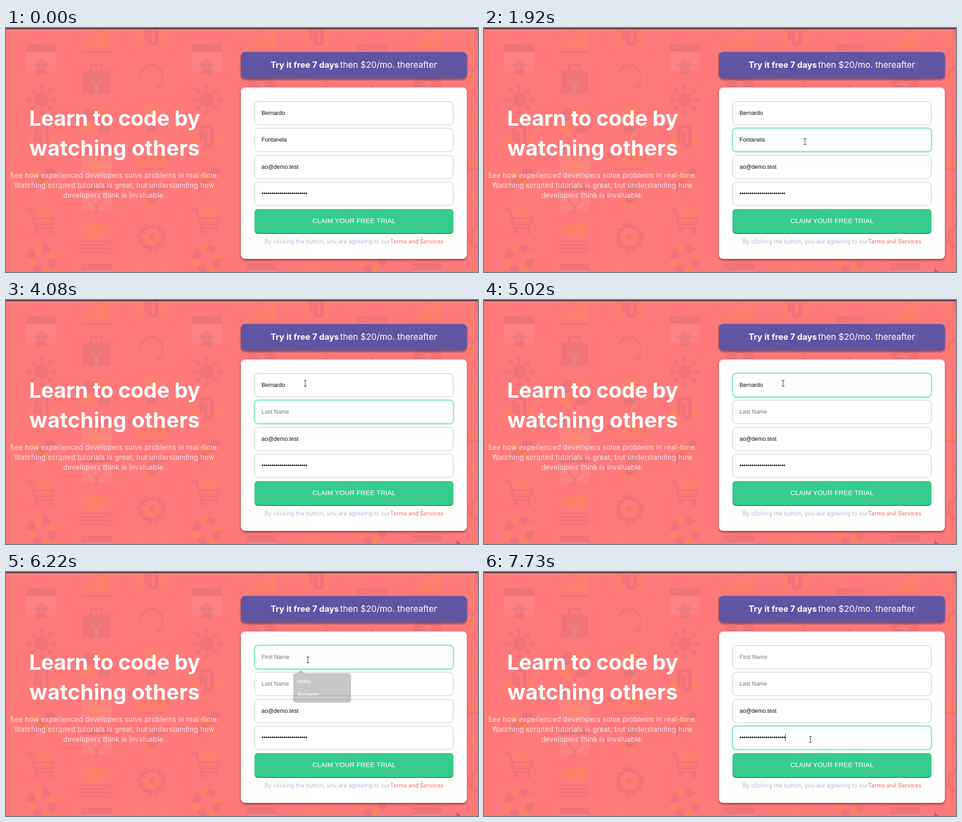
Animation of 1039x539 px, one loop 8 s. Source, as an HTML page:

```html
<!DOCTYPE html>
<html lang="en">
<head>
<meta charset="utf-8">
<title>Sign-up form</title>
<style>
html, body { margin: 0; width: 100%; height: 100%; overflow: hidden; background: #ff7979; }
svg { display: block; width: 1039px; height: 539px; }
text { font-family: Inter, "Open Sans", sans-serif; }
#icons * { --m: rgba(90, 70, 95, .1); --o: rgba(255, 150, 40, .2); --l: rgba(255, 255, 255, .07); }
#icons .m { fill: var(--m); }
#icons .o { fill: var(--o); }
#icons .l { fill: var(--l); }
#icons .ms { fill: none; stroke: var(--m); }
#icons .os { fill: none; stroke: var(--o); }
.raised { filter: drop-shadow(0 3px 2px rgba(70, 20, 25, .55)); }
.title { font-weight: 700; font-size: 47px; fill: #fff; text-anchor: middle; }
.lead { font-size: 15.2px; letter-spacing: .29px; fill: #f3e6ec; text-anchor: middle; }
.offer { fill: #fff; }
.terms { font-size: 12.7px; fill: #bab7d4; }
.link { font-size: 12.4px; font-weight: 500; fill: #ff7979; }
.field text, .button { font-family: "Liberation Sans", Arial, sans-serif; }
.field text { font-size: 12.5px; }
.box { fill: #fff; stroke: #c4c4c8; }
.focus { fill: #fff; stroke: #6be6b2; stroke-width: 1.4; filter: drop-shadow(0 0 2.2px rgba(70, 220, 155, .8)); }
.button { font-size: 15px; fill: #fff; text-anchor: middle; }
#popup text { font: 600 10.8px "Open Sans", "Noto Sans", sans-serif; fill: #f4f4f4; }
</style>
</head>
<body>
<svg viewBox="0 0 1039 539" xmlns="http://www.w3.org/2000/svg">
  <defs>
    <pattern id="icons" width="364" height="539" patternUnits="userSpaceOnUse"></pattern>
  </defs>
  <rect width="1039" height="539" fill="#ff7979"/>
  <rect width="1039" height="539" fill="url(#icons)"/>
  <rect width="1039" height="2.4" fill="#443b40"/>

  <text class="title" x="239" y="216" letter-spacing="-.3">Learn to code by</text>
  <text class="title" x="239" y="282" letter-spacing=".2">watching others</text>
  <text class="lead" x="238.5" y="330.5">See how experienced developers solve problems in real-time.</text>
  <text class="lead" x="238.5" y="352.5">Watching scripted tutorials is great, but understanding how</text>
  <text class="lead" x="238.5" y="374.5">developers think is invaluable.</text>

  <rect class="raised" x="517" y="53" width="497.5" height="58.5" rx="9" fill="#5f55a3"/>
  <text class="offer" x="582.5" y="88" font-size="18.5" font-weight="700">Try it free 7 days</text>
  <text class="offer" x="735.5" y="88" font-size="18.9">then $20/mo. thereafter</text>

  <rect class="raised" x="517" y="131.5" width="497.5" height="378.5" rx="9" fill="#fff"/>
  <g id="fields"></g>
  <rect x="547" y="400" width="438" height="55" rx="8" fill="#2a9f6d"/>
  <rect x="547" y="400" width="438" height="52.8" rx="8" fill="#38cc8c"/>
  <text class="button" x="766" y="431.4">CLAIM YOUR FREE TRIAL</text>
  <text class="terms" x="569" y="475.5">By clicking the button, you are agreeing to our</text>
  <text class="link" x="845.5" y="475.5">Terms and Services</text>

  <g id="popup">
    <path d="M639.5 222.5l8-8 8 8z" fill="#202020"/>
    <rect id="panel" x="630" y="222" width="132" rx="5" fill="#202020"/>
    <text id="item1" x="640" y="245"></text>
    <text id="item2" x="640" y="275"></text>
  </g>

  <path id="trail" d="M992 531l9 8h-9z" fill="#7a5560" opacity=".6"/>
  <g id="cursor">
    <path data-kind="beam" d="M-3-6.5H3M-3 6.5H3M0-6V6" fill="none" stroke="#222"/>
    <path data-kind="arrow" d="M0 0v15l3.5-3.3 2.4 5.5 2.3-1-2.4-5.4h4.8z" fill="#fff" stroke="#222" stroke-width=".9"/>
    <path data-kind="hand" d="M-1.5 1q1.5-2 3 0v6l7 1.5q2 .5 1.5 3L9 17H0l-5.500-7q0-2 2-1.500l2 2z" fill="#fff" stroke="#222" stroke-width=".9"/>
  </g>
</svg>
<script>
const $ = id => document.getElementById(id);
const clamp = v => Math.min(1, Math.max(0, v));
const range = n => [...Array(n).keys()];

// Background icons, each drawn around its own centre
const box = (c, x, y, w, h) => `<rect class="${c}" x="${x}" y="${y}" width="${w}" height="${h}"/>`;
const disc = (c, r, x = 0, y = 0) => `<circle class="${c}" r="${r}" cx="${x}" cy="${y}"/>`;
const ring = (c, r, w, parts = 0) =>
  `<circle class="${c}" r="${r}" stroke-width="${w}" stroke-dasharray="${parts ? Math.PI * r / parts : "none"}"/>`;
const line = (c, w, d) => `<path class="${c}" stroke-width="${w}" d="${d}"/>`;
const shape = (c, d) => `<path class="${c}" d="${d}"/>`;
const spin = (n, s) => range(n).map(i => `<g transform="rotate(${i * 360 / n})">${s}</g>`).join("");
const move = (x, y, s, turn = 0) => `<g transform="translate(${x} ${y}) rotate(${turn})">${s}</g>`;

const gear = ring("os", 10, 9) + ring("os", 16, 5, 8);
const win = y => box("m", -33, y, 66, 16) + box("l", -33, y + 16, 66, 43)
  + range(3).map(i => box("l", 7 * i - 28, y + 6, 4, 4)).join("");
const bars = range(4).map(i => box("o", 16 * i - 30, 2 - 9 * i, 12, 20 + 9 * i)).join("") + box("m", -33, 23, 66, 5);
const clip = line("ms", 7, "M-12 4v-26q0-6 6-6H6q6 0 6 6V8q0 6-6 6H2q-5 0-5-5v-26")
  + box("o", -31, -6, 13, 24) + box("o", 18, -6, 13, 24);
const upload = win(-34) + shape("m", "M0-4l-21 19h11v17h20V15h11z");
const virus = disc("m", 15) + spin(8, line("ms", 3, "M15 0h9") + disc("m", 4.5, 28));
const pencil = move(0, 0, box("m", -8, -34, 16, 68), 45) + move(0, 0, box("o", -6, -34, 12, 68), -45);
const cart = move(8, -14, gear) + line("ms", 4, "M-33-23h10l11 43h38M-18-2h46l-5 14h-37")
  + disc("m", 5, -9, 28) + disc("m", 5, 21, 28);
const buoy = ring("ms", 24, 16, 4) + move(0, 0, ring("os", 24, 16, 4), 45);
const briefcase = box("m", -30, -20, 60, 50) + line("ms", 5, "M-12-20v-13h24v13")
  + shape("l", "M-13-3q0 12 8 14v19H5V11q8-2 8-14L7 3H-7z");
const pictures = disc("m", 14, -16, -12) + disc("o", 14, 15, -16) + box("o", -31, 3, 26, 26) + box("m", 2, 3, 29, 26);
const search = win(-34) + ring("ms", 12, 5) + line("ms", 6, "M0 13v17");
const letter = shape("o", "M-32-26q14-12 30-8l24-2q12 8 8 22L16 0 6-8l-20 6q-16-8-18-24z")
  + range(4).map(i => box("m", -33, 3 + 8 * i, 66 - 8 * (i % 2), 3)).join("");
const headset = line("ms", 5, "M-24 0v-4a24 24 0 0 1 48 0v14q0 12-16 12")
  + box("o", -32, -12, 12, 24) + box("o", 20, -12, 12, 24);
const bulb = disc("o", 18, 0, -9) + box("m", -12, 11, 24, 22) + line("os", 4, "M-30-8h9M21-8h9");
const rocket = move(0, 0, shape("m", "M0-34q22 26 10 46h-20q-12-20 0-46z")
  + shape("o", "M-12-4l-14 18h14zM12-4l14 18H12zM-7 15H7L0 34z"), 40);
const cog = ring("ms", 24, 6) + ring("ms", 30, 5, 12) + spin(6, disc("o", 5, 13)) + disc("m", 5);
const hooks = [-30, -6, 18].map(x => line("os", 5, `M${x}-25q6-8 12 0 2 6-5 14`)).join("");

const columns = [
  [70, upload, virus, clip, pencil, cart, buoy],
  [27, bars, briefcase, pictures, win(-27) + move(0, 10, gear), search, letter, win(-35)],
  [22, clip, headset, bulb, bars, rocket, cog, hooks]
];
$("icons").innerHTML = columns.map(([y, ...icons], c) =>
  icons.map((icon, r) => move(78 + 121 * c, y + 88 * r, icon)).join("")).join("");

// Form
const LOOP = 8000, BLINK = 530, FADE = 190, TEXT_X = 562.5;
const OTHER = "dolku";
const values = ["Bernardo", "Fontanela", "ao@demo.test", "•".repeat(23)];
const hints = ["First Name", "Last Name", "", ""];
const rowY = i => Math.floor(162 + 59.6 * i);

// One backspace at `tap`, then the key is held from `hold`, one letter per `rate` ms
const visits = [
  { field: 1, start: 1380, tap: 2200, hold: 2730, rate: 60, close: 3084, items: 1 },
  { field: 0, start: 4480, tap: 5290, hold: 5840, rate: 36, close: 6078, items: 2 },
  { field: 3, start: 7530 }
];
// Pointer moves: start, end, x, y
const moves = [
  [170, 910, 710, 260], [1040, 1130, 707, 251], [2850, 3290, 660, 205], [3480, 4080, 659, 184],
  [5020, 5090, 665, 194], [6490, 7110, 717, 385], [7260, 7330, 719, 370]
];

$("fields").innerHTML = values.map((v, i) => {
  const y = rowY(i);
  const rect = c => `<rect class="${c}" x="547.5" y="${y + .5}" width="437" height="51.5" rx="8"/>`;
  return `<g class="field">${rect("box")}${rect("focus")}
    <text x="${TEXT_X}" y="${y + 30}">${v}</text>
    <rect class="caret" y="${y + 19}" width="1" height="13.5"/></g>`;
}).join("");

const fields = [...document.querySelectorAll(".field")].map(g => ({
  ring: g.querySelector(".focus"), text: g.querySelector("text"), caret: g.querySelector(".caret")
}));
const cursors = [...$("cursor").children];
const pen = document.createElement("canvas").getContext("2d");
pen.font = '12.5px "Liberation Sans", Arial, sans-serif';

function valueAt(i, t) {
  const v = visits.find(v => v.field === i && v.tap);
  if (!v || t < v.tap) return values[i];
  const held = t < v.hold ? 0 : 1 + Math.floor((t - v.hold) / v.rate);
  return values[i].slice(0, Math.max(0, values[i].length - 1 - held));
}

// The blink clock runs from focus; a key press only turns the caret back on
function caretOn(v, t) {
  const key = [v.hold, v.tap, v.start].find(k => k <= t);
  const ticks = time => Math.floor((time - v.start) / BLINK);
  return (ticks(t) - ticks(key)) % 2 === 0;
}

function drawFields(t, visit) {
  fields.forEach((f, i) => {
    const value = valueAt(i, t), on = visit && visit.field === i;
    f.text.textContent = value || hints[i];
    f.text.style.fill = value ? "#0c0c12" : "#757575";
    f.ring.style.opacity = on ? clamp((t - visit.start + 50) / 100) : 0;
    f.caret.style.opacity = on && caretOn(visit, t) ? 1 : 0;
    f.caret.setAttribute("x", Math.round(TEXT_X - .6 + pen.measureText(value).width));
  });
}

function drawPopup(t, visit) {
  const open = visit && visit.tap <= t;
  const opacity = open ? 1 - clamp((t - visit.close) / FADE) : 0;
  $("popup").style.opacity = opacity;
  if (!opacity) return;
  const { field, items } = visit, name = values[field];
  const full = items > 1 && !valueAt(field, t);
  const h = full ? 68 : 38, cy = 222 + h / 2;
  $("panel").setAttribute("height", h);
  $("item1").textContent = full ? OTHER : name;
  $("item2").textContent = full ? name : "";
  $("popup").setAttribute("transform",
    `translate(696 ${cy + field * 59}) scale(${.95 + .05 * opacity}) translate(-696 ${-cy})`);
}

function pointer(t) {
  let x = 992, y = 531;
  for (const [start, end, nx, ny] of moves) {
    const p = 1 - (1 - clamp((t - start) / (end - start))) ** 3;
    x += (nx - x) * p;
    y += (ny - y) * p;
  }
  return [x, y];
}

function kindAt(x, y) {
  if (x < 547 || x > 985) return "arrow";
  if (y >= 400 && y <= 455) return "hand";
  return values.some((v, i) => y >= rowY(i) && y <= rowY(i) + 52) ? "beam" : "arrow";
}

function drawCursor(t) {
  const [x, y] = pointer(t), kind = kindAt(x, y);
  const shift = kind === "beam" ? .5 : 0;
  $("cursor").style.display = $("trail").style.display = t < moves[0][0] ? "none" : "";
  $("cursor").setAttribute("transform", `translate(${Math.round(x) - shift} ${Math.round(y)})`);
  cursors.forEach(c => c.style.display = c.dataset.kind === kind ? "" : "none");
}

const begin = performance.now();
function frame() {
  const t = (performance.now() - begin) % LOOP;
  const visit = visits.filter(v => v.start <= t).pop();
  drawFields(t, visit);
  drawPopup(t, visit);
  drawCursor(t);
  requestAnimationFrame(frame);
}
frame();
</script>
</body>
</html>
```
